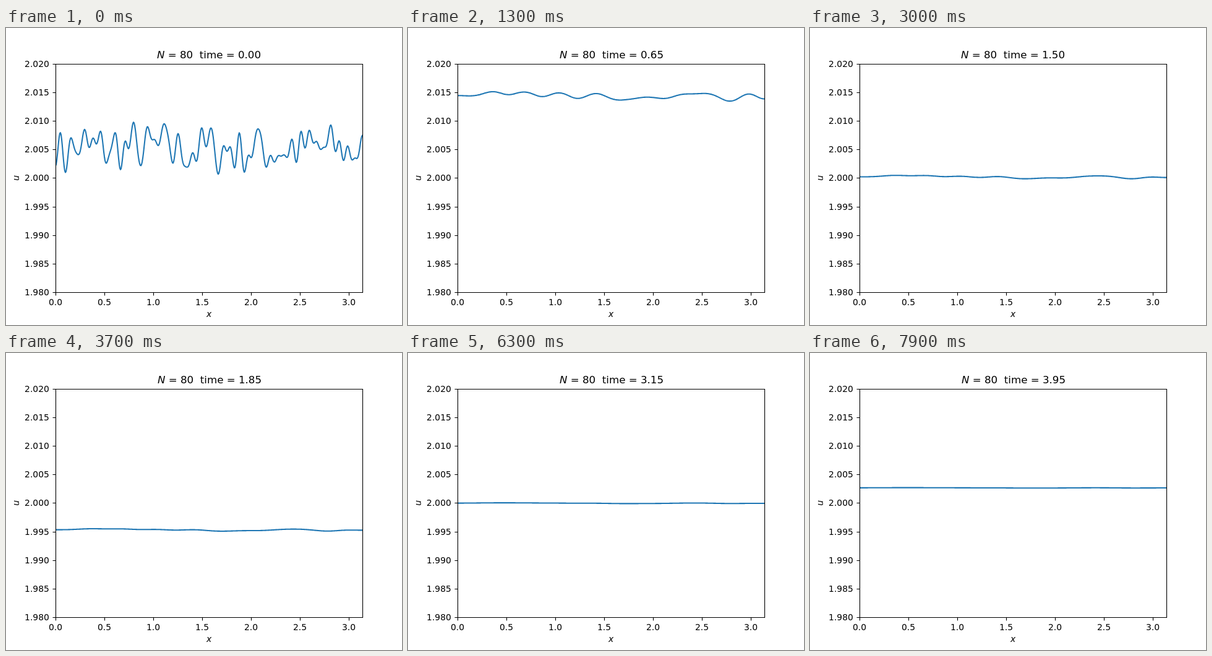
An HTML page that plays this animation: 640x480 px, repeating every 8000 ms.

```html
<!DOCTYPE html>
<html lang="en">
<head>
<meta charset="utf-8">
<title>Reaction and diffusion</title>
<style>
html, body { margin: 0; width: 100%; height: 100%; overflow: hidden; background: #fff; }
svg { display: block; width: 640px; height: 480px; }
text { font: 13.89px "DejaVu Sans", sans-serif; white-space: pre; }
#title { font-size: 16.67px; }
.it { font-style: italic; }
.mid { text-anchor: middle; }
.end { text-anchor: end; }
</style>
</head>
<body>
<svg viewBox="0 0 640 480">
  <clipPath id="area"><rect x="80" y="57.6" width="496" height="369.6"/></clipPath>
  <path id="line" clip-path="url(#area)" fill="none" stroke="#1f77b4" stroke-width="2.083" stroke-linejoin="round" stroke-linecap="square"/>
  <path id="axes" fill="none" stroke="#000" stroke-width="1.11"/>
  <g id="labels"></g>
  <text id="title" class="mid" y="49.3"><tspan class="it">N</tspan><tspan id="count"></tspan></text>
  <text class="mid it" x="328" y="467">x</text>
  <text class="mid it" transform="translate(21 242.4) rotate(-90)">u</text>
</svg>
<script>
const $ = id => document.getElementById(id);
const LEFT = 80, W = 496, MID = 242.4, UNIT = 9240;   // UNIT: pixels per 1 of u
const N = 80, COARSE = 24, T1 = 0.65, STEP = 100;

let seed = 7;
const random = () => (seed = seed * 16807 % 2147483647) / 2147483647;

// Noise of u between 2 and 2.01 on N cells
const start = Array.from({ length: N + 1 }, (_, i) =>
  [LEFT + W * i / N, MID - UNIT * 0.01 * random()]);

// Turning points of the smoothed wave at T1
const later = [
  [80, 109.5], [108, 109.3], [137, 102.8], [162, 108], [184, 103.5], [221, 111],
  [244, 104.7], [272, 114], [304, 106], [339, 116.8], [390, 111.8], [412, 114.3],
  [448, 106.5], [482, 106], [521, 118.7], [552, 106.5], [576, 115]];

// Cosine easing between points, one height per pixel
function heights(pts) {
  return Array.from({ length: W + 1 }, (_, i) => {
    const x = LEFT + i;
    const j = Math.max(1, pts.findIndex(p => p[0] >= x));
    const [x0, y0] = pts[j - 1], [x1, y1] = pts[j];
    return y0 + (y1 - y0) * (1 - Math.cos(Math.PI * (x - x0) / (x1 - x0))) / 2;
  });
}

const wave = (k, i) => Math.cos(Math.PI * k * i / W);

function cosineModes(h) {
  return Array.from({ length: N + 1 }, (_, k) => {
    const sum = h.reduce((s, y, i) => s + y * wave(k, i) * (i % W ? 1 : 0.5), 0);
    return sum * (k ? 2 : 1) / W;
  });
}

const first = cosineModes(heights(start));
const second = cosineModes(heights(later));

// Damped oscillation of the average height
const mean = t => MID - UNIT * 0.0201 * Math.exp(-0.513 * t) * Math.sin(1.91 * (t - 3.155));

// Each mode relaxes slowly; its mismatch at the start dies out quickly
function amplitude(k, t) {
  if (!k) return mean(t) + (first[0] - mean(0)) * Math.exp(-6 * t);
  const rate = 0.76 + 0.0045 * k * k;
  if (k > COARSE) return first[k] * Math.exp(-(rate + 2) * t);
  const slow = second[k] * Math.exp(rate * T1);
  return slow * Math.exp(-rate * t) + (first[k] - slow) * Math.exp(-(rate + 5) * t);
}

function drawAxes() {
  let d = "M80.5 58.5H576.5V427.5H80.5Z", labels = "";
  const snap = v => Math.floor(v + 0.5) + 0.5;
  for (let i = 0; i <= 6; i++) {
    const x = LEFT + W * i / 2 / Math.PI;
    d += `M${snap(x)} 427.5v5`;
    labels += `<text class="mid" x="${Math.round(x)}" y="448">${(i / 2).toFixed(1)}</text>`;
  }
  for (let i = 0; i <= 8; i++) {
    const y = 57.6 + 46.2 * i;
    d += `M80.5 ${snap(y)}h-5`;
    labels += `<text class="end" x="69.8" y="${Math.round(y + 5)}">${(2.02 - i * 0.005).toFixed(3)}</text>`;
  }
  $("axes").setAttribute("d", d);
  $("labels").innerHTML = labels;
}

function draw(n) {
  const t = n * 0.05;
  const amps = first.map((_, k) => amplitude(k, t));
  const pts = [];
  for (let i = 0; i <= W; i++) {
    const y = amps.reduce((s, a, k) => s + a * wave(k, i), 0);
    pts.push(`${LEFT + i} ${y.toFixed(2)}`);
  }
  $("line").setAttribute("d", "M" + pts.join("L"));
  $("count").textContent = ` = ${N}  time = ${t.toFixed(2)}`;
  $("title").setAttribute("x", n % 2 ? 329 : 328);
}

let shown = -1;
const began = performance.now();
function tick() {
  const n = Math.floor((performance.now() - began) % 8000 / STEP);
  if (n !== shown) draw(shown = n);
  requestAnimationFrame(tick);
}
drawAxes();
tick();
</script>
</body>
</html>
```
